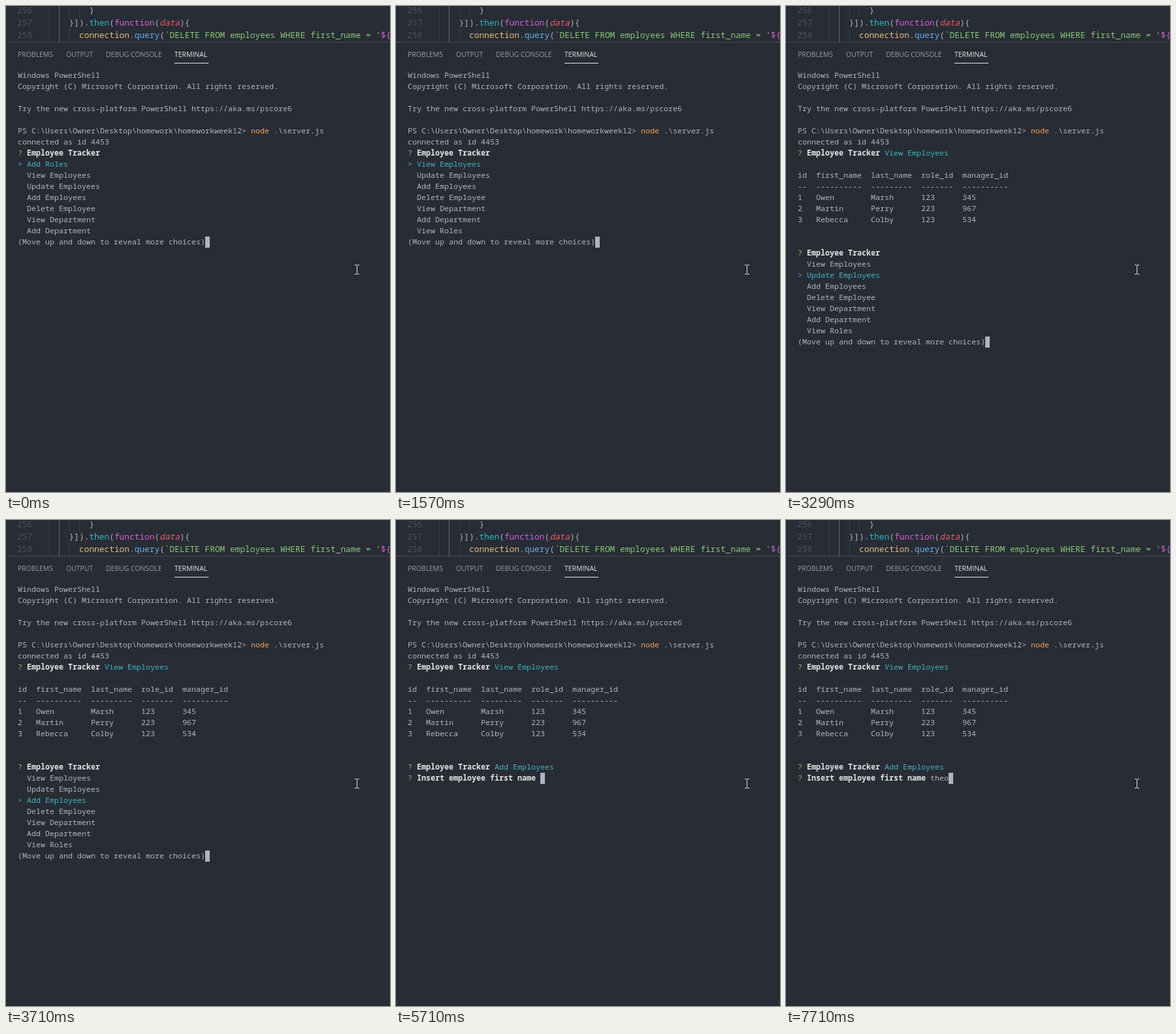
These frames come from a looping animation (588 px wide and 744 px high, 8000 ms). An HTML page with a canvas:

```html
<!DOCTYPE html>
<html lang="en">
<head>
<meta charset="utf-8">
<title>Terminal session</title>
<style>
  html, body { margin: 0; width: 100%; height: 100%; overflow: hidden; background: #282c34; }
  canvas { display: block; }
</style>
</head>
<body>
<canvas id="stage" width="588" height="744"></canvas>
<script>
const ctx = document.getElementById('stage').getContext('2d');
const LOOP = 8000;
const MONO = '"Noto Sans Mono", "DejaVu Sans Mono", monospace';
const SANS = '"Open Sans", "Noto Sans", sans-serif';
const BG = '#282c34', FG = '#b0b6c1', BRIGHT = '#e6e6e6', GREEN = '#8cc265', CYAN = '#42b3c2', ORANGE = '#f0a45d';

// Terminal grid
const LEFT = 18, TOP = 98, CELL = 7, ROW = 17;

const CHOICES = ['Add Roles', 'View Employees', 'Update Employees', 'Add Employees',
  'Delete Employee', 'View Department', 'Add Department', 'View Roles'];
const TABLE = [
  ['id', 'first_name', 'last_name', 'role_id', 'manager_id'],
  ['--', '----------', '---------', '-------', '----------'],
  ['1', 'Owen', 'Marsh', '123', '345'],
  ['2', 'Martin', 'Perry', '223', '967'],
  ['3', 'Rebecca', 'Colby', '123', '534']
];
const TABLE_COLS = [0, 4, 16, 27, 36];
const TYPED = 'theo';
const KEY_TIMES = [7000, 7290, 7430, 7710];

function box(x, y, w, h, color) {
  ctx.fillStyle = color;
  ctx.fillRect(x, y, w, h);
}

// Monospaced text, one glyph per cell
function glyphs(text, x, y, step, color, style = '') {
  ctx.font = `${style} ${step / 0.6}px ${MONO}`;
  ctx.fillStyle = color;
  [...text].forEach((c, i) => { if (c !== ' ') ctx.fillText(c, x + i * step, y); });
}

function put(row, col, text, color = FG, style = '') {
  glyphs(text, LEFT + col * CELL, TOP + row * ROW + 12, CELL, color, style);
}

function caret(row, col) {
  box(LEFT + col * CELL, TOP + row * ROW, CELL, ROW, '#aeb5c1');
}

function ask(row, question, answer = '', color = CYAN) {
  put(row, 0, '?', GREEN);
  put(row, 2, question, BRIGHT, 'bold');
  put(row, question.length + 3, answer, color);
}

function menu(row, first, selected, caretCol = 41) {
  CHOICES.slice(first, first + 7).forEach((name, i) => {
    const on = first + i === selected;
    if (on) put(row + i, 0, '>', CYAN);
    put(row + i, 2, name, on ? CYAN : FG);
  });
  put(row + 7, 0, '(Move up and down to reveal more choices)');
  caret(row + 7, caretCol);
}

function codeLine(number, y, x, parts) {
  const step = 7.7;
  glyphs(String(number), 17, y, step, '#495162');
  for (const [text, color, style] of parts) {
    glyphs(text, x, y, step, color, style);
    x += text.length * step;
  }
}

function drawEditor() {
  box(66, 0, 1, 55, '#3b4048');
  box(81, 0, 1, 55, '#62666d');
  box(97, 0, 1, 17, '#3b4048');
  box(112, 0, 1, 17, '#3b4048');
  box(97, 36, 1, 19, '#3b4048');
  const plain = '#abb2bf';
  codeLine(256, 11, 127.4, [['}', plain]]);
  codeLine(257, 30, 96.6, [['}]).', plain], ['then', '#2bbac5'], ['(', plain], ['function', '#d55fde'],
    ['(', plain], ['data', '#ef596f', 'italic'], ['){', plain]]);
  codeLine(258, 49, 112, [['connection', '#e5c07b'], ['.', plain], ['query', '#61afef'], ['(', plain],
    ["`DELETE FROM employees WHERE first_name = '", '#89ca78'], ['${', '#d55fde']]);
}

function drawTabs() {
  box(0, 55, 588, 1, '#474a51');
  ctx.font = `10.45px ${SANS}`;
  [['PROBLEMS', 18], ['OUTPUT', 92], ['DEBUG CONSOLE', 153], ['TERMINAL', 258]].forEach(([name, x], i) => {
    ctx.fillStyle = i === 3 ? '#e7e7e7' : '#9b9da1';
    ctx.fillText(name, x, 78);
  });
  box(258, 87, 52, 1, '#e7e7e7');
}

function drawIntro() {
  put(0, 0, 'Windows PowerShell');
  put(1, 0, 'Copyright (C) Microsoft Corporation. All rights reserved.');
  put(3, 0, 'Try the new cross-platform PowerShell https://aka.ms/pscore6');
  put(5, 0, 'PS C:\\Users\\Owner\\Desktop\\homework\\homeworkweek12>');
  put(5, 51, 'node', ORANGE);
  put(5, 56, '.\\server.js');
  put(6, 0, 'connected as id 4453');
}

function drawSession(t) {
  const title = 'Employee Tracker';
  if (t < 2140) {
    const pick = t < 1290 ? 0 : 1;
    ask(7, title);
    menu(8, pick, pick);
    return;
  }
  ask(7, title, 'View Employees');
  TABLE.forEach((cells, r) => cells.forEach((text, c) => put(9 + r, TABLE_COLS[c], text)));
  if (t < 3290) {
    ask(16, title, '(Use arrow keys)', FG);
    menu(17, 1, 1, 46);
  } else if (t < 4290) {
    ask(16, title);
    menu(17, 1, t < 3570 ? 2 : 3);
  } else {
    const typed = TYPED.slice(0, KEY_TIMES.filter(k => t >= k).length);
    ask(16, title, 'Add Employees');
    ask(17, 'Insert employee first name', typed, FG);
    caret(17, 29 + typed.length);
  }
}

function drawPointer() {
  const c = '#e4e5e7';
  box(537, 397, 1, 13, c);
  for (const y of [396, 410]) {
    box(534, y, 3, 1, c);
    box(538, y, 3, 1, c);
  }
}

function draw(t) {
  box(0, 0, 588, 744, BG);
  drawEditor();
  drawTabs();
  drawIntro();
  drawSession(t);
  drawPointer();
}

const start = performance.now();
function tick() {
  draw((performance.now() - start) % LOOP);
  requestAnimationFrame(tick);
}
tick();
</script>
</body>
</html>
```
